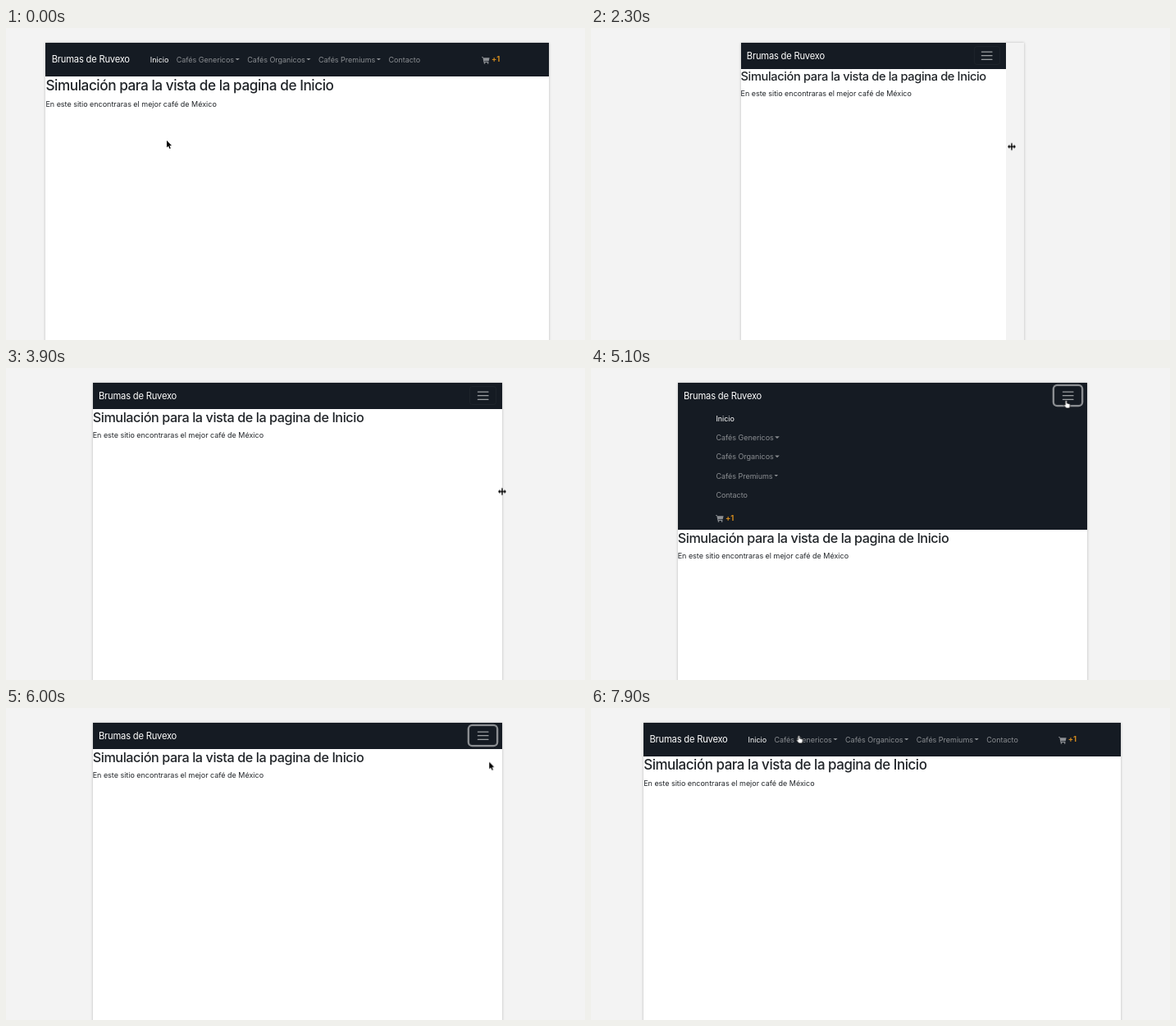
Animation of 706 by 380 pixels, one loop 8 s. Source, as an HTML page:

```html
<!DOCTYPE html>
<html lang="es">
<head>
<meta charset="utf-8">
<title>Menú adaptable</title>
<style>
  html, body { margin: 0; width: 100%; height: 100%; overflow: hidden; background: #f3f3f3; }
  body {
    position: relative;
    font: 400 9px/13.92px Inter, "Open Sans", sans-serif;
    font-optical-sizing: none;
    letter-spacing: -.002em;
    color: #212529;
  }

  /* Resizable preview, centred on the stage */
  .stage { position: absolute; top: 17.6px; left: 0; width: 710.4px; height: 400px; }
  .page {
    height: 100%; margin: 0 auto;
    box-shadow: 0 0 3px rgba(0, 0, 0, .24);
    animation: resize 8s linear infinite;
  }
  .view {
    height: 100%; background: #fff;
    container-type: inline-size;
    animation: lag 8s linear infinite;
  }

  nav { position: relative; height: 41.6px; background: #151b23; white-space: nowrap; }
  .brand {
    position: absolute; left: 7.3px; top: 11.8px;
    font-size: 11.2px; line-height: 18px; letter-spacing: -.019em; color: #fff;
  }
  .menu { position: absolute; left: 127.4px; top: 9.2px; display: flex; }
  .link { height: 23.2px; line-height: 23.2px; margin-right: 9.28px; color: rgba(255, 255, 255, .5); }
  .link.on { color: #fff; }
  .drop::after {
    content: ""; display: inline-block; vertical-align: 2.3px;
    width: 5.6px; height: 2.8px; margin-left: 1.4px;
    background: currentColor; clip-path: polygon(0 0, 100% 0, 50% 100%);
  }
  .cart {
    position: absolute; top: 0; left: calc(83cqw - 104.6px);
    display: flex; align-items: center; height: 23.2px;
    font-size: 9.4px; font-weight: 700; color: #d38b1d;
  }
  .cart svg { width: 9.6px; height: 9px; margin: 2px 2px 0 0; }
  .toggle { display: none; }

  h2 {
    margin: 0 0 5px;
    font-weight: 500; font-size: calc(11.87px + .8685cqw); line-height: 1.2435;
    letter-spacing: -.026em; white-space: nowrap;
  }
  p { margin: 0; white-space: nowrap; }

  @container (max-width: 575px) {
    nav { height: auto; padding-top: 32.5px; }
    .brand { top: 7.6px; }
    .menu {
      position: static; display: block; overflow: hidden; padding-left: 46.7px;
      animation: unfold 8s infinite;
    }
    .cart { position: static; height: 30.5px; padding-top: 3px; box-sizing: border-box; }
    .toggle {
      position: absolute; right: 7px; top: 4.64px; box-sizing: border-box;
      display: flex; align-items: center; justify-content: center;
      width: 32.5px; height: 23.2px; border-radius: 3.5px;
      border: 1px solid rgba(255, 255, 255, .035);
      animation: focus 8s step-end infinite;
    }
    .toggle svg { width: 17.4px; height: 17.4px; }
  }

  .cursor {
    position: absolute; left: 0; top: 0; width: 1px; height: 1px; overflow: visible;
    animation: point 8s linear infinite;
  }
  .cursor g { animation: 8s step-end infinite; stroke-linejoin: round; }
  .cursor .arrow { animation-name: arrow; }
  .cursor .drag { animation-name: drag; }
  .cursor .hand { animation-name: hand; }

  @keyframes resize {
    0%, 20% { width: 613.5px; }
    28.75% { width: 345.6px; }
    31.25%, 32.5% { width: 306px; }
    43.75% { width: 466px; }
    48.75%, 83.75% { width: 499px; }
    85% { width: 505.6px; }
    87.5%, 100% { width: 582px; }
  }
  @keyframes lag {
    0%, 23.75%, 31.25%, 100% { margin-right: 0; }
    28.75% { margin-right: 22px; }
  }
  @keyframes unfold {
    0%, 59.4% { height: 0; animation-timing-function: ease; }
    63.75%, 68.79% { height: 146.5px; animation-timing-function: ease; }
    73.165%, 100% { height: 0; }
  }
  @keyframes focus {
    0% { box-shadow: none; }
    59.4%, 100% { box-shadow: 0 0 0 2.32px #8b8e92; }
  }
  @keyframes point {
    0%, 13.75% { transform: translate(196px, 137px); }
    15% { transform: translate(330px, 141px); }
    16.25% { transform: translate(560px, 146px); }
    17.5%, 20% { transform: translate(662.5px, 150px); }
    28.75% { transform: translate(513px, 144.5px); }
    31.25%, 32.5% { transform: translate(508px, 144.5px); }
    43.75% { transform: translate(591px, 149px); }
    48.75%, 50% { transform: translate(605px, 150.5px); }
    55% { transform: translate(578.5px, 50px); }
    57.5%, 72.5% { transform: translate(579.5px, 40px); }
    78.75%, 81.25% { transform: translate(603.7px, 104px); }
    85%, 92.5% { transform: translate(645.5px, 105px); }
    96.25% { transform: translate(400px, 25px); }
    98.75%, 100% { transform: translate(253.5px, 34px); }
  }
  @keyframes arrow {
    0%, 50%, 73.75%, 85% { opacity: 1; }
    17.5%, 57.5%, 80%, 97.5%, 100% { opacity: 0; }
  }
  @keyframes drag {
    0%, 50%, 85%, 100% { opacity: 0; }
    17.5%, 80% { opacity: 1; }
  }
  @keyframes hand {
    0%, 73.75% { opacity: 0; }
    57.5%, 97.5%, 100% { opacity: 1; }
  }
</style>
</head>
<body>
<div class="stage">
  <div class="page">
    <div class="view">
      <nav>
        <div class="brand">Brumas de Ruvexo</div>
        <div class="toggle">
          <svg viewBox="0 0 30 30"><path d="M4 7h22M4 15h22M4 23h22" stroke="#fff" stroke-opacity=".58" stroke-width="2" stroke-linecap="round"/></svg>
        </div>
        <div class="menu">
          <div class="link on">Inicio</div>
          <div class="link drop">Cafés Genericos</div>
          <div class="link drop">Cafés Organicos</div>
          <div class="link drop">Cafés Premiums</div>
          <div class="link">Contacto</div>
          <div class="cart">
            <svg viewBox="0 0 18 16" fill="#8d9094"><path d="M0 0h3.6l.5 2H18l-1.7 7.5H6l.3 1.5h9.4v1.6H4.8L2.5 1.6H0z"/><circle cx="6.6" cy="14.3" r="1.7"/><circle cx="14.3" cy="14.3" r="1.7"/></svg>
            +1
          </div>
        </div>
      </nav>
      <h2>Simulación para la vista de la pagina de Inicio</h2>
      <p>En este sitio encontraras el mejor café de México</p>
    </div>
  </div>
</div>

<svg class="cursor">
  <g class="arrow">
    <path d="M0 0V8.6L2 6.8 3.4 10 4.8 9.4 3.4 6.3H6.1Z" fill="#000" stroke="#fff" stroke-width=".7" paint-order="stroke"/>
  </g>
  <g class="drag">
    <path d="M-5 0l2.4-2.4v1.7h1.9V-4.3H.7V-.7h1.9v-1.7L5 0 2.6 2.4V.7H.7V4.3H-.7V.7h-1.9v1.7z" fill="#000" stroke="#fff" stroke-width="1" paint-order="stroke"/>
  </g>
  <g class="hand">
    <path d="M-1.2 .6Q-1.1-.4-.1-.4T1 .6V3.1Q1.8 2.6 2.4 3.4 3.2 2.9 3.7 3.8 4.8 3.5 4.8 4.8 4.8 6.8 3.9 8.9H-.2Q-1 7.4-2.9 5.6-2.9 4.4-1.7 4.8L-1.2 5.2Z" fill="#fff" stroke="#000" stroke-width=".7"/>
  </g>
</svg>

<script>
  // Advance every animation on one clock, ten pictures a second.
  const LOOP = 8000, STEP = 100;
  let start;

  function tick(now) {
    start ??= now;
    const t = Math.floor(((now - start + 5) % LOOP) / STEP) * STEP;
    for (const anim of document.getAnimations()) {
      if (anim.playState !== "paused") anim.pause();
      anim.currentTime = t;
    }
    requestAnimationFrame(tick);
  }
  requestAnimationFrame(tick);
</script>
</body>
</html>
```
